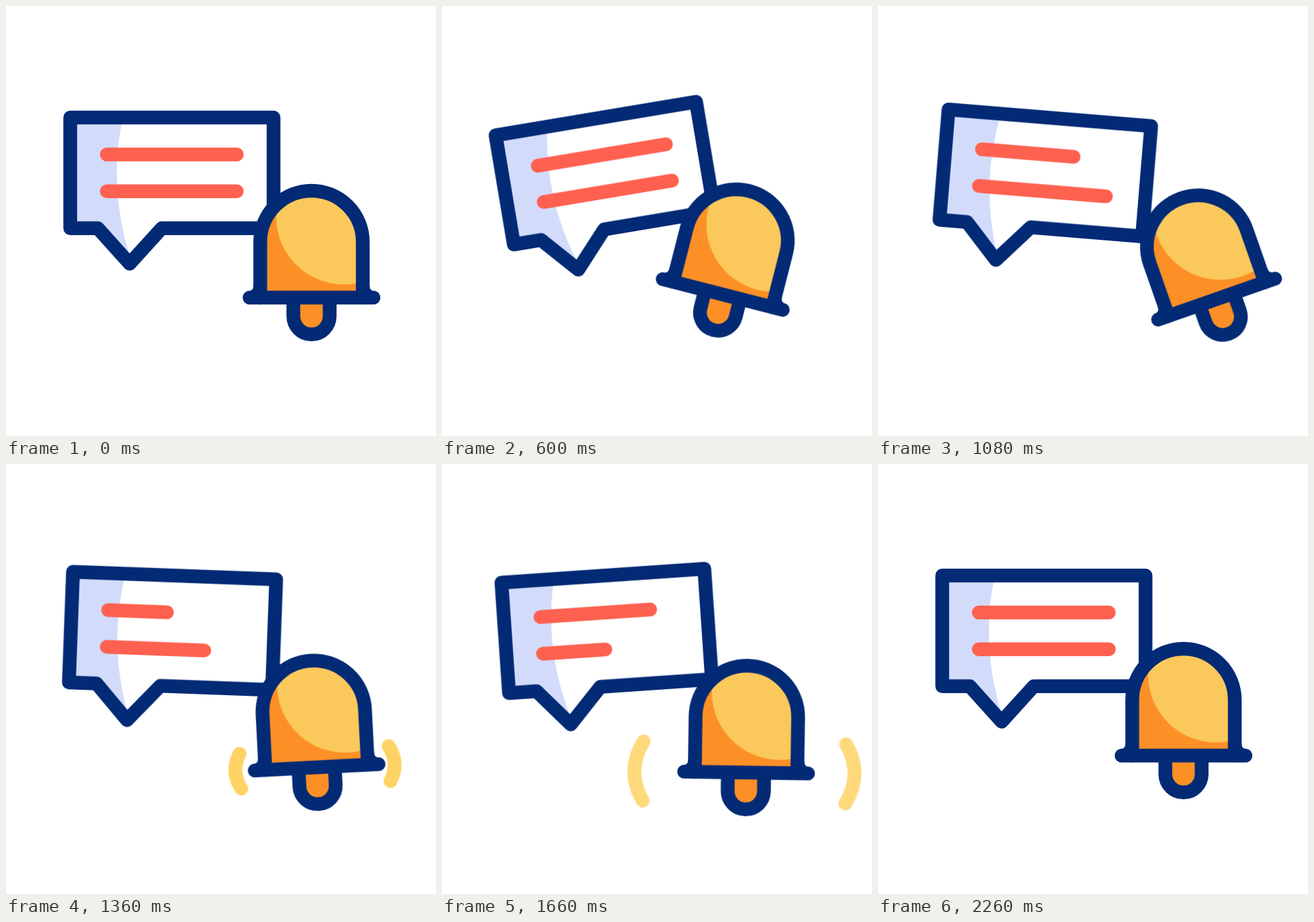
These frames come from a looping animation (640x640 px, 2400 ms). An HTML page without scripts:

```html
<!DOCTYPE html>
<html lang="en">
<head>
<meta charset="utf-8">
<title>Message bell</title>
<style>
  html, body { margin: 0; width: 100%; height: 100%; overflow: hidden; background: #fff; }
  svg { display: block; width: 100vw; height: 100vh; }

  .ink, .text, .wave { fill: none; stroke-width: 20.5; stroke-linecap: round; stroke-linejoin: round; }
  .ink { stroke: #032a75; }
  .text { stroke: #ff6150; }
  .wave { stroke: #fed265; }
  .orange { fill: #fc9026; }
  .yellow { fill: #fbc85c; }

  .bubble, .drop, .swing, .text, .wave, .waves {
    animation: 2400ms cubic-bezier(.333, 0, .667, 1) infinite;
  }
  .bubble { transform-origin: 247px 274.8px; animation-name: tilt; }
  .drop { animation-name: drop; animation-timing-function: linear; }
  .swing { transform-origin: 454.7px 285px; animation-name: swing; }
  .one { animation-name: one; }
  .two { animation-name: two; }
  .waves { animation-name: fade; animation-timing-function: linear; }
  .wave { animation-name: spread; animation-timing-function: linear; }

  @keyframes tilt {
    0%, 8.1% { transform: rotate(0deg); }
    27.7% { transform: rotate(-10deg); }
    46.67% { transform: rotate(5deg); }
    75% { transform: rotate(-5deg); }
    94.17%, 100% { transform: rotate(0deg); }
  }
  @keyframes drop {
    0%, 27.5% { transform: translateY(0); }
    69.17% { transform: translateY(25.2px); }
    75% { transform: translateY(30px); }
    91.67%, 100% { transform: translateY(0); }
  }
  @keyframes swing {
    0%, 8.1% { transform: rotate(0deg); }
    27.5% { transform: rotate(15deg); }
    46.67% { transform: rotate(-20deg); }
    64.17% { transform: rotate(8deg); }
    75% { transform: rotate(-8deg); }
    94.17%, 100% { transform: rotate(0deg); }
  }
  @keyframes one {
    0%, 34.17% { d: path("M150 221H343.5"); }
    55.17% { d: path("M150 221H236"); }
    76.67%, 100% { d: path("M150 221H343.5"); }
  }
  @keyframes two {
    0%, 41.25% { d: path("M150 275.7H343.5"); }
    74.37% { d: path("M150 275.7H236"); }
    94.17%, 100% { d: path("M150 275.7H343.5"); }
  }
  @keyframes fade {
    0%, 46.67% { opacity: 0; }
    51%, 67.5% { opacity: 1; }
    69.17% { opacity: .88; }
    70.83%, 100% { opacity: 0; }
  }
  @keyframes spread {
    0%, 46.67% { d: path("M79.2 -11.6Q85.4 0 79.2 11.6"); }
    70.83%, 100% { d: path("M156 -46.4Q183.5 0 156 46.4"); }
  }
</style>
</head>
<body>
<svg viewBox="0 0 640 640">
  <defs>
    <path id="dome" d="M378.4 434V351.2a76.3 76.3 0 0 1 152.6 0V434"/>
    <path id="clapper" d="M427.7 434V461.8a27 27 0 0 0 54 0V434"/>
    <path id="box" d="M95.6 166H398.2V330.7H232L184 383.5L136.5 330.7H95.6Z"/>
    <clipPath id="inside"><use href="#dome"/></clipPath>
  </defs>

  <g class="bubble">
    <use href="#box" fill="#fff"/>
    <path fill="#d2dcfa" d="M95.6 166H174C163 215 158 290 184.500 372V383L136.500 330.700H95.600Z"/>
    <path class="text one" d="M150 221H343.5"/>
    <path class="text two" d="M150 275.7H343.5"/>
    <use href="#box" class="ink"/>
  </g>

  <g class="drop">
    <g class="swing">
      <g class="waves">
        <g transform="translate(452.3 434)">
          <path class="wave" d="M79.2 -11.6Q85.4 0 79.2 11.6"/>
          <g transform="scale(-1 1)"><path class="wave" d="M79.2 -11.6Q85.4 0 79.2 11.6"/></g>
        </g>
      </g>
      <use href="#clapper" class="orange"/>
      <use href="#clapper" class="ink"/>
      <use href="#dome" class="orange"/>
      <circle class="yellow" cx="503" cy="313.5" r="101" clip-path="url(#inside)"/>
      <use href="#dome" class="ink"/>
      <path class="ink" d="M362.5 434H547"/>
      <path fill="#032a75" d="M368.2 416Q368.200 424 361 424.500H372V416ZM541.200 416Q541.200 424 548.400 424.500H537V416Z"/>
    </g>
  </g>
</svg>
</body>
</html>
```
